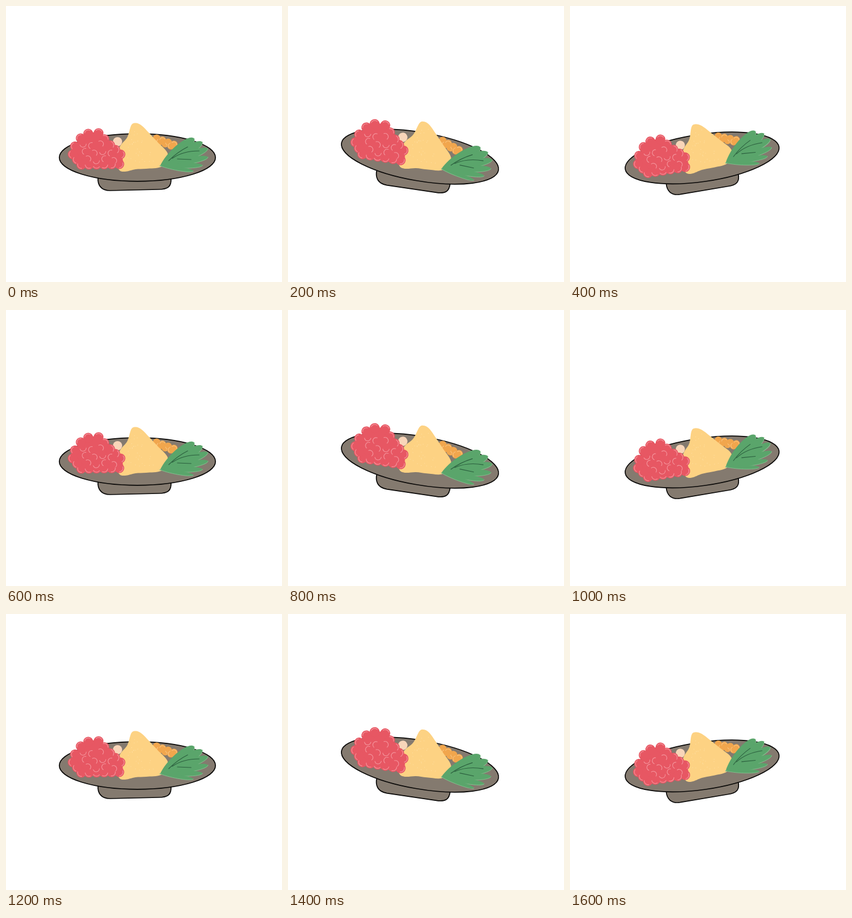
An HTML page with a canvas for the animation above (1.8 s loop, 480 by 480 pixels).

```html
<!DOCTYPE html>
<html lang="en">
<head>
<meta charset="utf-8">
<title>Rocking plate</title>
<style>
html, body { margin: 0; width: 100%; height: 100%; overflow: hidden; background: #fff; }
canvas { display: block; }
</style>
</head>
<body>
<canvas id="stage" width="480" height="480"></canvas>
<script>
const ctx = document.getElementById('stage').getContext('2d');
const STEP = 200;
const PIVOT = [228.5, 263.5];
const POSES = [
  { x: 228.5, y: 263.5, tilt: 0, size: 1 },
  { x: 229.5, y: 262, tilt: 9.8, size: 1.02 },
  { x: 229.8, y: 264.3, tilt: -8.2, size: 0.995 }
];
const PINK = '#e75763', PINK_LIGHT = '#f4949c';
const GREEN = '#5aa56b', GREEN_LIGHT = '#84c08f', GREEN_DARK = '#2b5f3e';

const toPoints = text => text.trim().split(/\s+/).map(p => p.split(',').map(Number));

// Smooth closed outline through the given points.
function blob(pts) {
  const at = i => pts[(i + pts.length) % pts.length];
  const path = new Path2D();
  path.moveTo(...pts[0]);
  pts.forEach((p, i) => {
    const a = at(i - 1), q = at(i + 1), b = at(i + 2);
    path.bezierCurveTo(
      p[0] + (q[0] - a[0]) / 6, p[1] + (q[1] - a[1]) / 6,
      q[0] - (b[0] - p[0]) / 6, q[1] - (b[1] - p[1]) / 6, q[0], q[1]);
  });
  return path;
}

// Evenly spaced points along the edges of a polygon.
function walk(corners, gap) {
  return corners.flatMap(([x, y], i) => {
    const [nx, ny] = corners[(i + 1) % corners.length];
    const count = Math.max(1, Math.round(Math.hypot(nx - x, ny - y) / gap));
    return Array.from({ length: count }, (_, k) =>
      [x + (nx - x) * k / count, y + (ny - y) * k / count]);
  });
}

function fill(path, color) {
  ctx.fillStyle = color;
  ctx.fill(path);
}

function line(path, color, width) {
  ctx.strokeStyle = color;
  ctx.lineWidth = width;
  ctx.stroke(path);
}

function disc(x, y, r, color) {
  const path = new Path2D();
  path.arc(x, y, r, 0, 7);
  fill(path, color);
}

function curl(x, y, r, start, sweep, color) {
  const path = new Path2D();
  path.arc(x, y, r, start, start + sweep);
  line(path, color, 1.1);
}

const foot = new Path2D('M160 298C159 311 165 321 181 321L265 319C282 319 288 314 287 299Z');
const dish = new Path2D();
dish.ellipse(...PIVOT, 135.8, 41.3, 0, 0, 7);

const mash = blob(toPoints(`218,207 226,203.5 236,208 249,221 263,236 280,254 280,267
  269,280 244,283 225,284 207,288 196,284 190,262 199,243 211,228`));
const pile = toPoints('143,222 161,221 181,242 199,258 197,275 131,276 116,258 120,244 130,230');
const pileCore = blob(pile);
const rim = walk(pile, 13);

function drawLentils() {
  for (let i = 0; i < 7; i++) {
    const x = 262 + 5 * i, y = 230 + 1.8 * i + (i % 2) * 4;
    disc(x, y, 6.6, '#f1a64d');
    curl(x, y, 4.7, i * 1.7, 2.4, '#f9c37e');
  }
}

function drawMash() {
  fill(mash, '#fdd283');
  let seed = 7;
  const random = () => (seed = seed * 16807 % 2147483647) / 2147483647;
  for (let i = 0; i < 34; i++) {
    const depth = random();
    disc(228 + (random() - 0.5) * (16 + 58 * depth), 215 + 60 * depth, 0.6, '#ffe0a5');
  }
}

function drawBerries() {
  fill(pileCore, PINK);
  rim.forEach(([x, y]) => disc(x, y, 8.6, PINK));
  rim.forEach(([x, y]) =>
    curl(x, y, 6.4, Math.atan2(y - 252, x - 157) - 0.9, 1.9, PINK_LIGHT));
  for (let row = 0; row < 3; row++) {
    for (let i = 0; i < 3 + (row > 0); i++) {
      curl(134 + 4 * row + 15 * i, 240 + 13 * row + 3 * (i % 2), 5.5,
        2.1 * (i + row), 2.8, PINK_LIGHT);
    }
  }
}

// A fan of leaves, narrowing from the top one to the bottom one.
function drawLeaves() {
  for (let i = 0; i < 6; i++) {
    const length = 76 + 20 * Math.sin(i * 0.63) - 3.4 * i;
    const width = 13 - 1.7 * i;
    const side = w => `C${length * 0.35} ${w} ${length * 0.97} ${w} ${length} 0`;
    ctx.save();
    ctx.translate(268, 278);
    ctx.rotate((9.6 * i - 39) * Math.PI / 180);
    fill(new Path2D(`M0 0${side(-width)}M0 0${side(width)}`), GREEN);
    line(new Path2D(`M0 0${side(width)}`), GREEN_LIGHT, 0.9);
    ctx.restore();
  }
  line(new Path2D('M283 269Q298 254 316 245M289 265Q308 252 336 252M298 266L322 267'),
    GREEN_DARK, 1.1);
}

function drawPlate() {
  for (const path of [foot, dish]) {
    fill(path, '#847a6f');
    line(path, '#080706', 1.7);
  }
  disc(194, 236, 8, '#f8d5b9');
  drawLentils();
  drawMash();
  drawBerries();
  drawLeaves();
}

function frame(time) {
  const pose = POSES[Math.floor(time / STEP) % POSES.length];
  ctx.setTransform(1, 0, 0, 1, 0, 0);
  ctx.fillStyle = '#fff';
  ctx.fillRect(0, 0, 480, 480);
  ctx.translate(pose.x, pose.y);
  ctx.rotate(pose.tilt * Math.PI / 180);
  ctx.scale(pose.size, pose.size);
  ctx.translate(-PIVOT[0], -PIVOT[1]);
  drawPlate();
}

ctx.lineCap = ctx.lineJoin = 'round';
const begin = performance.now();
function tick() {
  frame(performance.now() - begin);
  requestAnimationFrame(tick);
}
tick();
</script>
</body>
</html>
```
